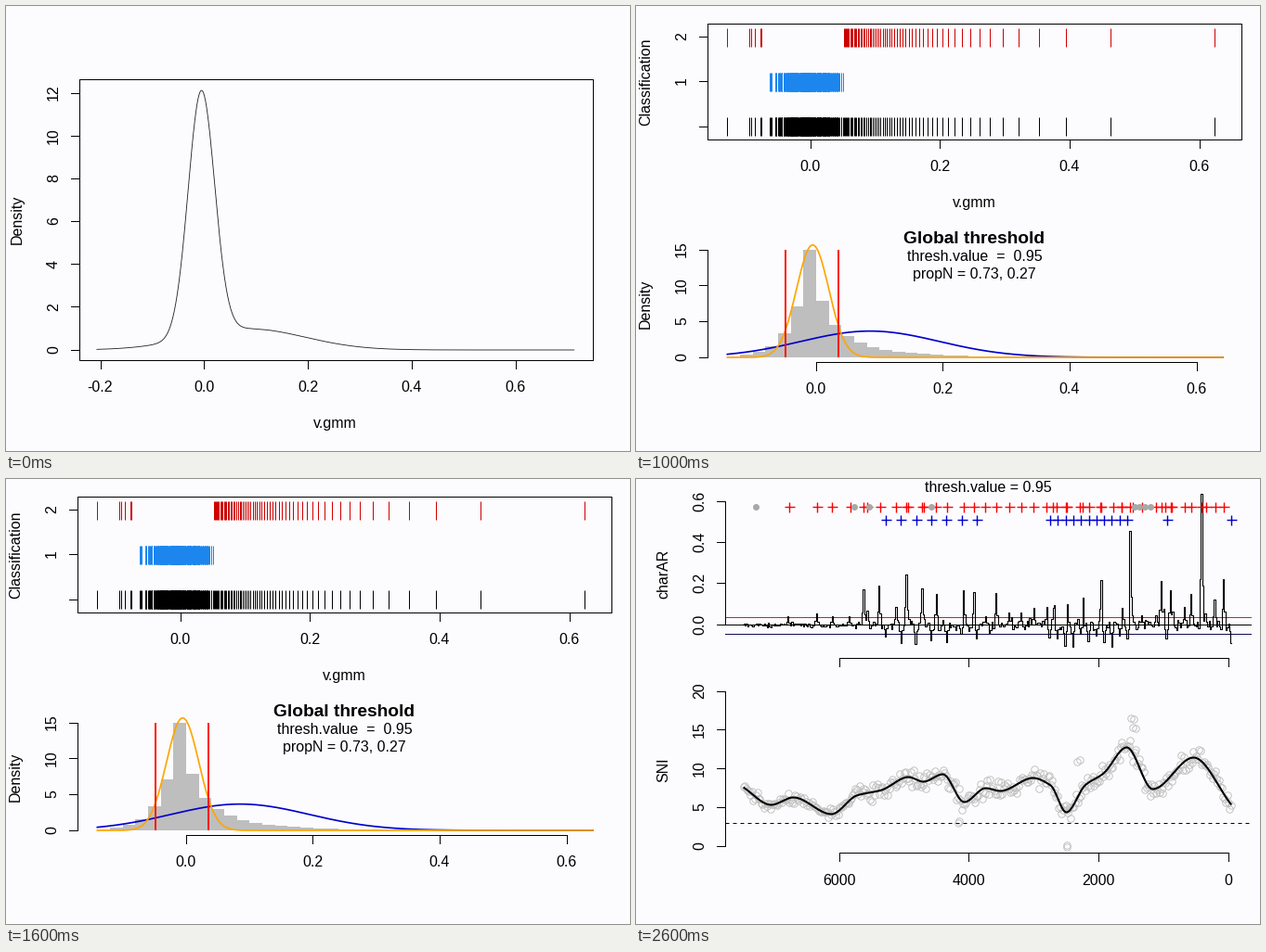
Animation, 672 px wide and 480 px high, one loop 3000 ms. Source, as a matplotlib script:

```python
import numpy as np
import matplotlib.pyplot as plt
from matplotlib.animation import FuncAnimation

W, H, DPI = 672, 480, 100
PX = 72 / DPI  # points per pixel
BG = "#fcfcfe"
RED, BLUE, GREY = "#ff1000", "#0000cd", "#bebebe"

plt.rcParams["font.family"] = "Liberation Sans"
fig = plt.figure(figsize=(W / DPI, H / DPI), dpi=DPI, facecolor=BG)


def stage():
    """Axes over the whole figure; pixels count from one at the top left."""
    ax = fig.add_axes([0, 0, 1, 1])
    ax.set_xlim(0.5, W + 0.5)
    ax.set_ylim(H + 0.5, 0.5)
    ax.axis("off")
    return ax


def line(ax, xs, ys, color="black", width=1, **kw):
    ax.plot(xs, ys, color=color, lw=width * PX, **kw)


def marks(ax, xs, ys, color, shape, size, edge, **kw):
    line(ax, xs, ys, color, ls="", marker=shape, ms=size * PX,
         mew=edge * PX, **kw)


def text(ax, x, y, s, size=16, rotation=0, **kw):
    ax.text(x, y, s, fontsize=size * PX, rotation=rotation, ha="center",
            va="baseline", rotation_mode="anchor", **kw)


def x_axis(ax, y, first, last, labels, title="", mid=0):
    line(ax, [first, last], [y, y])
    for x, s in zip(np.linspace(first, last, len(labels)), labels):
        line(ax, [x, x], [y, y + 9])
        text(ax, x, y + 35, s)
    text(ax, mid, y + 73.5, title)


def y_axis(ax, x, first, last, labels, title, mid):
    line(ax, [x, x], [first, last])
    for y, s in zip(np.linspace(first, last, len(labels)), labels):
        line(ax, [x - 9, x], [y, y])
        text(ax, x - 22.5, y, s, rotation=90)
    text(ax, x - 61.5, mid, title, rotation=90)


def box(ax, x0, y0, x1, y1):
    line(ax, [x0, x1, x1, x0, x0], [y0, y0, y1, y1, y0])


def tenths(start, stop):
    return [f"{k / 10:.1f}" for k in range(start, stop + 1, 2)]


def normal(x, mean, sd):
    return np.exp(-0.5 * ((x - mean) / sd) ** 2) / (sd * np.sqrt(2 * np.pi))


def narrow(x):
    return normal(x, -0.0055, 0.0255)


def wide(x):
    return normal(x, 0.085, 0.109)


def smooth(x, points):
    """Cubic curve through the points that turns only at their extremes."""
    px, py = np.array(points, dtype=float).T
    h, rise = np.diff(px), np.diff(py) / np.diff(px)
    a, b = rise[:-1], rise[1:]
    inner = np.where(a * b > 0, 2 * a * b / np.where(a + b == 0, 1, a + b), 0)
    slope = np.concatenate([rise[:1], inner, rise[-1:]])
    i = np.clip(np.searchsorted(px, x) - 1, 0, len(h) - 1)
    t = (x - px[i]) / h[i]
    return ((1 + 2 * t) * (1 - t) ** 2 * py[i] + t * t * (3 - 2 * t) * py[i + 1]
            + t * (1 - t) * h[i] * ((1 - t) * slope[i] - t * slope[i + 1]))


def mixture_scene():
    ax = stage()
    box(ax, 79, 79, 632, 382)
    x = np.linspace(-0.207, 0.713, 600)
    dens = 0.73 * narrow(x) + 0.27 * wide(x)
    line(ax, 214 + 558.5 * x, 371.5 - 23.1 * dens, "#202020", 0.85)
    x_axis(ax, 382, 102, 549, tenths(-2, 6), "v.gmm", 355)
    y_axis(ax, 79, 371, 94, [str(k) for k in range(0, 13, 2)], "Density", 231)
    return ax


def rug(ax, xs, y, color):
    ax.vlines(xs, y - 10, y + 10, color=color, lw=PX)


def classes(ax, rng):
    box(ax, 77, 19, 652, 144)
    core = np.round(rng.normal(184, 18, 320))
    core = core[(core >= 138) & (core <= 223)]
    # heavy-tailed quantiles
    u = (np.arange(58) + 0.5) / 58
    high = np.round(223 + 582 * ((1 - u) ** -0.11 - 1))
    outer = np.concatenate([[98, 122, 124, 128, 134, 135], high])
    rug(ax, outer, 34, "#cd0000")
    rug(ax, core, 82, "#1c86ee")
    rug(ax, np.concatenate([outer, core]), 130, "black")
    y_axis(ax, 77, 130, 33, ["", "1", "2"], "Classification", 82)
    x_axis(ax, 144, 188, 607, tenths(0, 6), "v.gmm", 365)


def threshold(ax):
    zero, unit, base, scale = 194.5, 683.3, 379.5, 7.75
    bins = np.arange(-6, 32)
    k = abs(bins + 1)
    heights = np.where(bins < 0, 15 * 0.47 ** k, 10 * 0.4 ** k + 5 * 0.77 ** k)
    step = 0.02 * unit
    ax.bar(zero + step * bins, -scale * heights, step, bottom=base,
           align="edge", color=GREY, lw=0)
    x = np.linspace(-0.14, 0.641, 500)
    for f, color in ((wide, BLUE), (narrow, "orange")):
        line(ax, zero + unit * x, base - scale * f(x), color, 1.7)
    for cut in (161, 218):
        line(ax, [cut, cut], [263, 379], RED, 2, solid_capstyle="butt")
    y_axis(ax, 77, 379, 263, ["0", "5", "10", "15"], "Density", 321.5)
    x_axis(ax, 384, 194, 604, tenths(0, 6))
    text(ax, 365, 257, "Global threshold", 19.2, weight="bold")
    text(ax, 365, 275.5, "thresh.value  =  0.95")
    text(ax, 365, 294.5, "propN = 0.73, 0.27")


def threshold_scene(rng):
    ax = stage()
    classes(ax, rng)
    threshold(ax)
    return ax


def charcoal(ax, rng):
    base = 158
    tall = [(245, 119), (291, 103), (308, 118), (453, 97), (464, 82),
            (481, 58), (501, 109), (523, 95), (532, 56), (566, 110),
            (576, 120), (609, 16)]
    # small peaks crowd together towards the right
    small = 165 + 468 * np.linspace(0, 1, 36) ** 0.8 + rng.normal(0, 2, 36)
    rise = 9 + rng.exponential(np.where(small < 240, 3, 15))
    low = np.concatenate([np.linspace(269, 367, 7), np.linspace(446, 529, 11),
                          [572, 641]])
    spikes = list(zip(small, base - np.minimum(rise, 50))) + tall
    spikes += list(zip(low, base + rng.uniform(9, 24, len(low))))

    xs = np.arange(116.5, 642, 1.4)
    ys = base + rng.normal(0, 1, len(xs)) * np.where(xs < 230, 1.3, 3.2)
    for x, y in spikes:
        i = int(np.argmin(abs(xs - x)))
        for j, share in ((i - 1, 0.35), (i, 1), (i + 1, 0.3)):
            if j < len(xs):
                ys[j] = base + share * (y - base)
    for y, color in ((149, RED), (157, "black"), (167, "#101050")):
        line(ax, [96, 662], [y, y], color)
    line(ax, xs, ys, width=1.1, drawstyle="steps-mid")

    high = np.concatenate([small, [x for x, _ in tall]])
    weak = np.concatenate([[129, 235, 251, 318], np.linspace(537, 554, 4)])
    for xs, y, color in ((high, 30, "red"), (low, 44, BLUE)):
        xs = np.round(xs)
        marks(ax, xs, np.full(len(xs), y), color, "+", 11, 1.4)
    marks(ax, weak, np.full(len(weak), 30), "#a8a8a8", "o", 7, 0)


def signal(ax, rng):
    bends = [(116, 333), (146, 352), (170, 344), (211, 362), (238, 342),
             (265, 336), (294, 322), (310, 327), (331, 319), (354, 349),
             (377, 334), (393, 337), (428, 323), (447, 331), (464, 360),
             (484, 331), (504, 318), (529, 290), (557, 335), (601, 301),
             (641, 351)]
    far = np.repeat([(348, 371), (467, 396), (477, 305), (535, 260),
                     (538, 268)], 2, axis=0)
    far = far + rng.normal(0, 1.5, far.shape)
    xs = np.arange(116.5, 642, 1.45)
    noise = np.clip(rng.normal(0, 1, len(xs)), -2, 2)
    ys = smooth(xs, bends) + noise * np.where(xs < 230, 3, 5)
    marks(ax, np.append(xs, far[:, 0]), np.append(ys, far[:, 1]), GREY, "o",
          7.5, 0.9, mfc="none")
    line(ax, [96, 662], [371, 371], dashes=(4, 4))
    xs = np.linspace(117, 641, 500)
    line(ax, xs, smooth(xs, bends), width=2.1)


def series_scene(rng):
    ax = stage()
    charcoal(ax, rng)
    y_axis(ax, 96, 157, 24, tenths(0, 6), "charAR", 103)
    x_axis(ax, 193, 219, 638, [""] * 4)
    text(ax, 380, 15, "thresh.value = 0.95")
    signal(ax, rng)
    y_axis(ax, 96, 396, 229, [str(k) for k in range(0, 21, 5)], "SNI", 314)
    x_axis(ax, 403, 219, 638, ["6000", "4000", "2000", "0"])
    return ax


rng = np.random.default_rng(4)
scenes = [mixture_scene(), threshold_scene(rng), series_scene(rng)]


def update(n):
    for k, ax in enumerate(scenes):
        ax.set_visible(k == n)
    return scenes


anim = FuncAnimation(fig, update, frames=3, interval=1000, repeat=True,
                     repeat_delay=0, blit=False)
plt.show()
```
